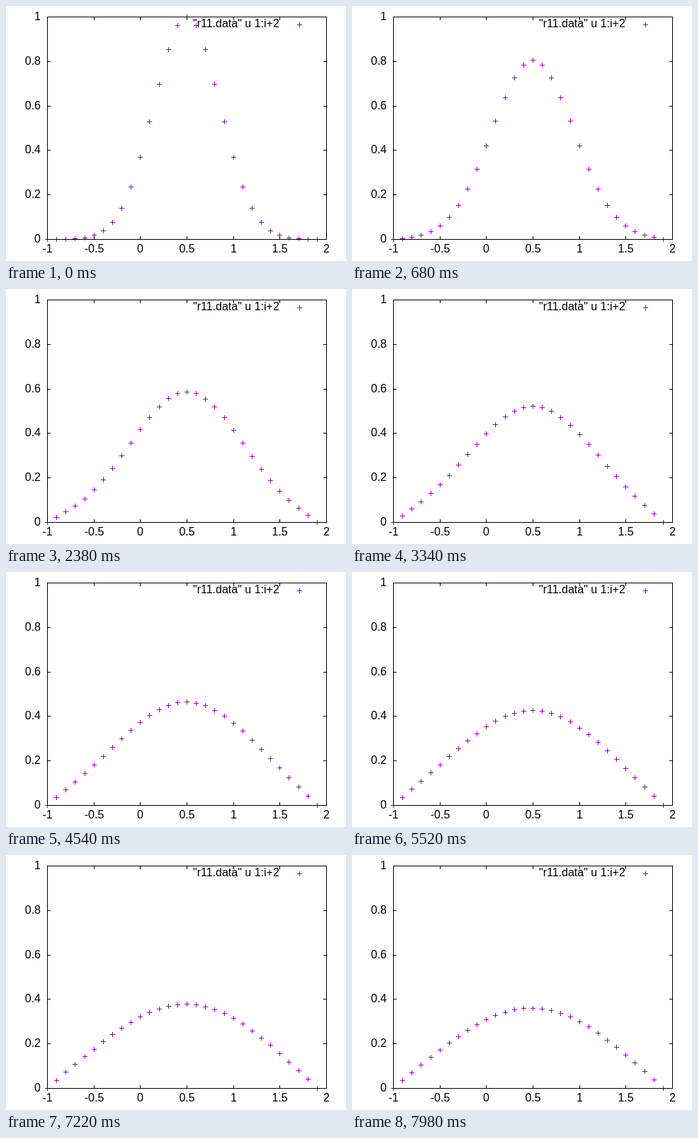
Write an HTML page with a canvas that moves like this. It is 480 by 360 pixels and loops after 8000 ms.

```html
<!DOCTYPE html>
<html lang="en">
<head>
<meta charset="utf-8">
<title>Diffusion plot</title>
<style>
  html, body { margin: 0; width: 100%; height: 100%; overflow: hidden; background: #fff; }
  canvas { display: block; }
</style>
</head>
<body>
<canvas id="plot" width="480" height="360"></canvas>
<script>
const ctx = document.getElementById("plot").getContext("2d");
const LEFT = 58, RIGHT = 452, TOP = 15, BOTTOM = 329;
const TICK = 5, ARM = 3;
const STEP_MS = 20, STEPS = 400, POINTS = 30, RATE = 0.1;

const toX = x => LEFT + Math.round((x + 1) / 3 * (RIGHT - LEFT));
const toY = y => BOTTOM - Math.round(y * (BOTTOM - TOP));
const gridX = i => -1 + i / 10;

// Explicit heat equation: a Gaussian spreads between fixed ends.
function diffuse(u) {
  return u.map((v, i) => i === 0 || i === POINTS - 1
    ? v
    : v + RATE * (u[i - 1] - 2 * v + u[i + 1]));
}

const states = [Array.from({ length: POINTS }, (_, i) => Math.exp(-4 * (gridX(i) - 0.5) ** 2))];
while (states.length < STEPS) states.push(diffuse(states[states.length - 1]));

function cross(x, y) {
  // Marks on odd columns and rows are grey.
  ctx.fillStyle = x % 2 && y % 2 ? "#444444" : "#9400d3";
  ctx.fillRect(x - ARM, y, 2 * ARM + 1, 1);
  ctx.fillRect(x, y - ARM, 1, 2 * ARM + 1);
}

function text(label, x, y, align) {
  ctx.textAlign = align;
  ctx.fillText(label, x, y);
}

function drawAxes() {
  ctx.fillStyle = "#000";
  ctx.font = '16px "Liberation Sans", Arial, sans-serif';
  const width = RIGHT - LEFT + 1, height = BOTTOM - TOP + 1;
  for (const y of [TOP, BOTTOM]) ctx.fillRect(LEFT, y, width, 1);
  for (const x of [LEFT, RIGHT]) ctx.fillRect(x, TOP, 1, height);

  for (let i = 0; i <= 5; i++) {
    const y = toY(i / 5);
    ctx.fillRect(LEFT, y, TICK, 1);
    ctx.fillRect(RIGHT - TICK + 1, y, TICK, 1);
    text(String(i / 5), 49, y + 5, "right");
  }
  for (let i = 0; i <= 6; i++) {
    const value = -1 + i / 2, x = toX(value);
    ctx.fillRect(x, TOP, 1, TICK);
    ctx.fillRect(x, BOTTOM - TICK + 1, 1, TICK);
    text(String(value), x + 0.5, 348, "center");
  }
  text('"r11.data" u 1:i+2', 264, 30, "left");
}

function draw(step) {
  ctx.fillStyle = "#fff";
  ctx.fillRect(0, 0, 480, 360);
  states[step].forEach((v, i) => cross(toX(gridX(i)), toY(v)));
  cross(414, 26);
  drawAxes();
}

const start = performance.now();
function tick() {
  const elapsed = Math.max(0, performance.now() - start);
  draw(Math.floor(elapsed / STEP_MS) % STEPS);
  requestAnimationFrame(tick);
}
tick();
</script>
</body>
</html>
```
